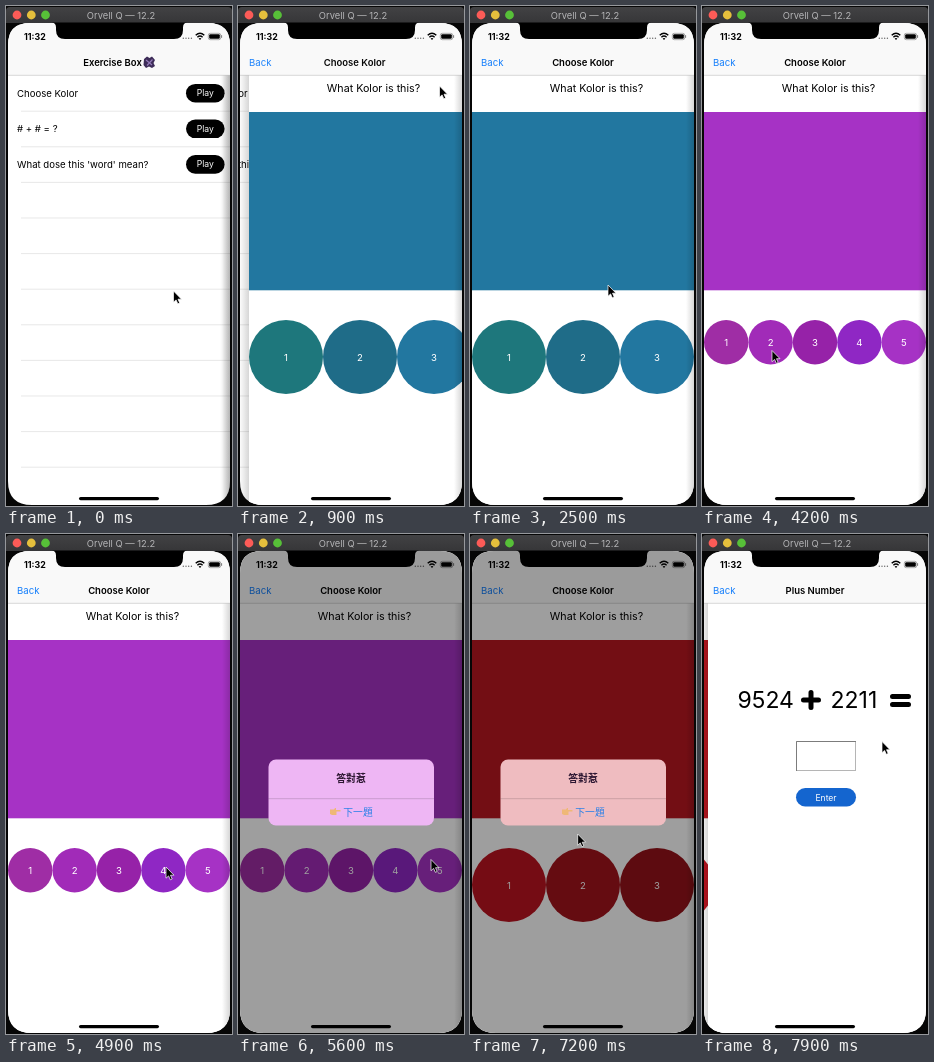
Write an HTML page that moves like this. It is 226 px wide and 500 px high and loops after 8000 ms.

```html
<!DOCTYPE html>
<html lang="en">
<head>
<meta charset="utf-8">
<title>Exercise Box</title>
<style>
  html, body { margin: 0; width: 100%; height: 100%; overflow: hidden; background: #060606; }
  svg { display: block; width: 100%; height: 100%; }
  text { font: 9.6px Inter, Roboto, sans-serif; }
  .mid { text-anchor: middle; }
  .title { font-weight: 600; font-size: 9.5px; }
  .button { font-size: 8.6px; fill: #fff; }
  .cjk { font: 9.8px "Noto Sans CJK TC", "Noto Sans CJK", sans-serif; }
</style>
</head>
<body>
<svg viewBox="0 0 226 500">
  <defs>
    <clipPath id="screen"><path d="M24 17H202Q224 17 224 39V475Q224 499 200 499H26Q2 499 2 475V39Q2 17 24 17Z"/></clipPath>
    <linearGradient id="bar" x2="0" y2="1"><stop stop-color="#424244"/><stop offset="1" stop-color="#363638"/></linearGradient>
    <linearGradient id="edge"><stop stop-color="#000" stop-opacity="0"/><stop offset="1" stop-color="#000" stop-opacity=".16"/></linearGradient>
  </defs>

  <path d="M0 17V5Q0 1 4 1H222Q226 1 226 5V17Z" fill="url(#bar)"/>
  <circle cx="11" cy="9" r="4.4" fill="#fc5b57"/>
  <circle cx="25.3" cy="9" r="4.4" fill="#e5bf3c"/>
  <circle cx="39.5" cy="9" r="4.4" fill="#57c038"/>
  <text x="115" y="12.6" class="mid" fill="#b4b4b6" style="font-size:9.4px">Orvell Q — 12.2</text>

  <g clip-path="url(#screen)">
    <rect y="17" width="226" height="483" fill="#fff"/>
    <g id="list"></g>

    <g id="quiz">
      <rect x="-8" y="69" width="10" height="431" fill="url(#edge)"/>
      <rect x="2" y="69" width="222" height="431" fill="#fff"/>
      <text x="126.5" y="86.4" class="mid" style="font-size:10.7px">What Kolor is this?</text>
      <rect id="swatch" x="2" y="106" width="222" height="178.3"/>
      <g id="choices"></g>
    </g>

    <g id="sum">
      <rect x="-6" y="69" width="8" height="431" fill="url(#edge)"/>
      <rect x="2" y="69" width="222" height="431" fill="#fff"/>
      <g style="--s:23px">
        <text x="31.5" y="174" style="font-size:var(--s)">9524</text>
        <text x="124.5" y="174" style="font-size:var(--s)">2211</text>
      </g>
      <path d="M97.5 166H112.5M105 158.5V173.5M186.5 162.5H202.5M186.5 170.5H202.5" stroke="#000" stroke-width="5" stroke-linecap="round"/>
      <rect x="90.5" y="207.5" width="59" height="29" fill="#fff" stroke="#b5b5b5"/>
      <path d="M90.5 237V207.5H150" fill="none" stroke="#7c7c7c"/>
      <rect x="90" y="254" width="60" height="18.5" rx="9.25" fill="#1465cf"/>
      <text x="120" y="266.5" class="mid button">Enter</text>
    </g>

    <rect y="17" width="226" height="52" fill="#f9f9f9"/>
    <path d="M0 69.3H226" stroke="#bcbcbc" stroke-width=".6"/>
    <g id="listTitle">
      <text x="106.5" y="59.8" class="mid title">Exercise Box</text>
      <path d="M138 53L141 50.5 143.5 52 146 50.5 149 54 147.5 57 149 60 146 62 143 60.5 140 62 137.5 59Z" fill="#3d2c58"/>
      <path d="M140 54L146 59M146.5 53.5L141 59.5" stroke="#9278b8" stroke-width="1.2"/>
    </g>
    <text id="quizTitle" x="113" y="59.8" class="mid title">Choose Kolor</text>
    <text id="sumTitle" x="113" y="59.8" class="mid title">Plus Number</text>
    <text id="back" x="11" y="59.8" fill="#147efb">Back</text>

    <text x="18" y="33.8" style="font-size:8.8px;font-weight:700">11:32</text>
    <g fill="#666"><circle cx="177.3" cy="32.3" r=".7"/><circle cx="180" cy="32.3" r=".7"/><circle cx="182.7" cy="32.3" r=".7"/><circle cx="185.4" cy="32.3" r=".7"/></g>
    <path d="M189.7 29.3Q194 25.3 198.3 29.3M191.4 31.2Q194 28.9 196.6 31.2" fill="none" stroke="#000" stroke-width="1.4"/>
    <path d="M192.6 32.5Q194 31.4 195.4 32.5L194 34Z"/>
    <rect x="202.3" y="27.3" width="12.4" height="6.4" rx="1.9" fill="none" stroke="#777" stroke-width=".6"/>
    <rect x="203.2" y="28.2" width="10.6" height="4.6" rx="1.1"/>
    <path d="M215.6 29.2V31.8" stroke="#777"/>
    <rect x="73" y="491" width="80" height="3.2" rx="1.6"/>

    <g id="alert">
      <rect y="17" width="226" height="483" fill-opacity=".38"/>
      <rect id="panel" x="30.5" y="225.5" width="165.5" height="66" rx="7.5"/>
      <path d="M30.5 264.7H196" stroke="#000" stroke-opacity=".22" stroke-width=".7"/>
      <text x="113" y="247.8" class="mid cjk" style="font-weight:700" fill="#2d1732">答對惹</text>
      <path d="M92 275.5H96L97 274H98V276H102.5V277.6H98.5V281H94L92 280Z" fill="#efb877"/>
      <text x="105.3" y="281.8" class="cjk" fill="#2b80e8">下一題</text>
    </g>
  </g>
  <path d="M46 16.5Q50 17 50 21.5V24Q50 33 59 33H168Q177 33 177 24V21.5Q177 17 181 16.5Z"/>

  <path id="cursor" d="M0 0V11.2L2.6 8.9 4.3 12.8 6.2 12 4.5 8.2H8Z" stroke="#fff" stroke-width=".7"/>
</svg>

<script>
const LOOP = 8000, STEP = 100, WIDTH = 222;
const $ = id => document.getElementById(id);

const QUESTIONS = [
  { start: 0, color: '#2277a0', panel: '#c3dfec', choices: ['#1e777c', '#1f6c88', '#2277a0'] },
  { start: 2600, color: '#a632c5', panel: '#eeb6f4', choices: ['#9f2da5', '#a12bb8', '#9622a8', '#8f27c4', '#a632c5'] },
  { start: 6200, color: '#b91620', panel: '#efbcc0', choices: ['#bd1420', '#a3141c', '#951219'] }
];

// Tracks: [time, value, ...]
const CURSOR = [
  [0, 167.5, 285], [100, 174, 248], [300, 194, 130], [500, 202, 81], [900, 201.5, 80],
  [1200, 200, 180], [1500, 196, 315], [1700, 191, 345], [2000, 191, 345], [2300, 138, 279],
  [2500, 138, 279], [3000, 70, 330], [3600, 40, 342], [4200, 70, 344.5], [4900, 160, 333],
  [5200, 193, 325.5], [5600, 193, 325.5], [5900, 140, 277], [6100, 140, 277], [6300, 154, 265],
  [6700, 45, 344], [7000, 45, 344], [7300, 139, 278], [7500, 139, 278], [7900, 180, 207.5]
];
const QUIZ_X = [[600, WIDTH], [700, 160], [800, 50], [900, 9], [1000, 1], [1100, 0]];
const SUM_X = [[7500, WIDTH], [7600, 160], [7700, 50], [7800, 12], [7900, 4]];
const ALERT = [
  [1800, 0], [1900, .5], [2000, 1], [2300, 1], [2400, .5], [2500, 0],
  [5400, 0], [5500, .6], [5600, 1], [6000, 1], [6100, .5], [6200, 0],
  [6800, 0], [6900, .5], [7000, 1], [7300, 1], [7400, .5], [7500, 0]
];

function sample(track, t) {
  const next = track.findIndex(key => key[0] > t);
  if (next === 0) return track[0].slice(1);
  if (next < 0) return track.at(-1).slice(1);
  const [a, b] = [track[next - 1], track[next]];
  const p = (t - a[0]) / (b[0] - a[0]);
  return a.slice(1).map((v, i) => v + (b[i + 1] - v) * p);
}

function move(id, x, y = 0) { $(id).setAttribute('transform', `translate(${x} ${y})`); }
function fade(id, opacity) { $(id).setAttribute('opacity', opacity); }

function buildList() {
  const pitch = 35.6;
  let html = '';
  for (let i = 0; i < 11; i++)
    html += `<path d="M15 ${105.2 + i * pitch}H224" stroke="#dedede" stroke-width=".7"/>`;
  ['Choose Kolor', '# + # = ?', "What dose this 'word' mean?"].forEach((label, i) => {
    const y = 87.2 + i * pitch;
    html += `<text x="11" y="${y + 3.3}">${label}</text>
      <rect x="180" y="${y - 9.3}" width="38.6" height="18.6" rx="9.3"/>
      <text x="199.3" y="${y + 3}" class="mid button">Play</text>`;
  });
  $('list').innerHTML = html;
}

let shown;
function showQuestion(q) {
  if (q === shown) return;
  shown = q;
  $('swatch').setAttribute('fill', q.color);
  $('panel').setAttribute('fill', q.panel);
  const size = WIDTH / q.choices.length, r = size / 2;
  const cy = 314 + r;
  $('choices').innerHTML = q.choices.map((color, i) => {
    const cx = 2 + size * (i + .5);
    return `<circle cx="${cx}" cy="${cy}" r="${r}" fill="${color}"/>
      <text x="${cx}" y="${cy + 3.5}" class="mid" fill="#fff">${i + 1}</text>`;
  }).join('');
}

function render(t) {
  const [quizX] = sample(QUIZ_X, t), [sumX] = sample(SUM_X, t);
  const quizIn = 1 - quizX / WIDTH, sumIn = 1 - sumX / WIDTH;
  showQuestion(QUESTIONS.findLast(q => t >= q.start));

  move('list', -65 * quizIn);
  move('quiz', quizX - 65 * sumIn);
  move('sum', sumX);
  move('listTitle', -60 * quizIn);
  move('quizTitle', quizX * .4 - 60 * sumIn);
  move('sumTitle', (sumX - 4) * .4);
  fade('listTitle', Math.max(0, 1 - quizIn * 1.1));
  fade('quizTitle', Math.max(0, quizIn - sumIn * 1.1));
  fade('sumTitle', sumIn);
  fade('back', quizIn);
  fade('alert', sample(ALERT, t)[0]);
  move('cursor', ...sample(CURSOR, t));
}

buildList();
const begin = performance.now();
function tick(now) {
  const t = Math.max(0, now - begin) % LOOP;
  render(Math.floor(t / STEP) * STEP);
  requestAnimationFrame(tick);
}
render(0);
requestAnimationFrame(tick);
</script>
</body>
</html>
```
